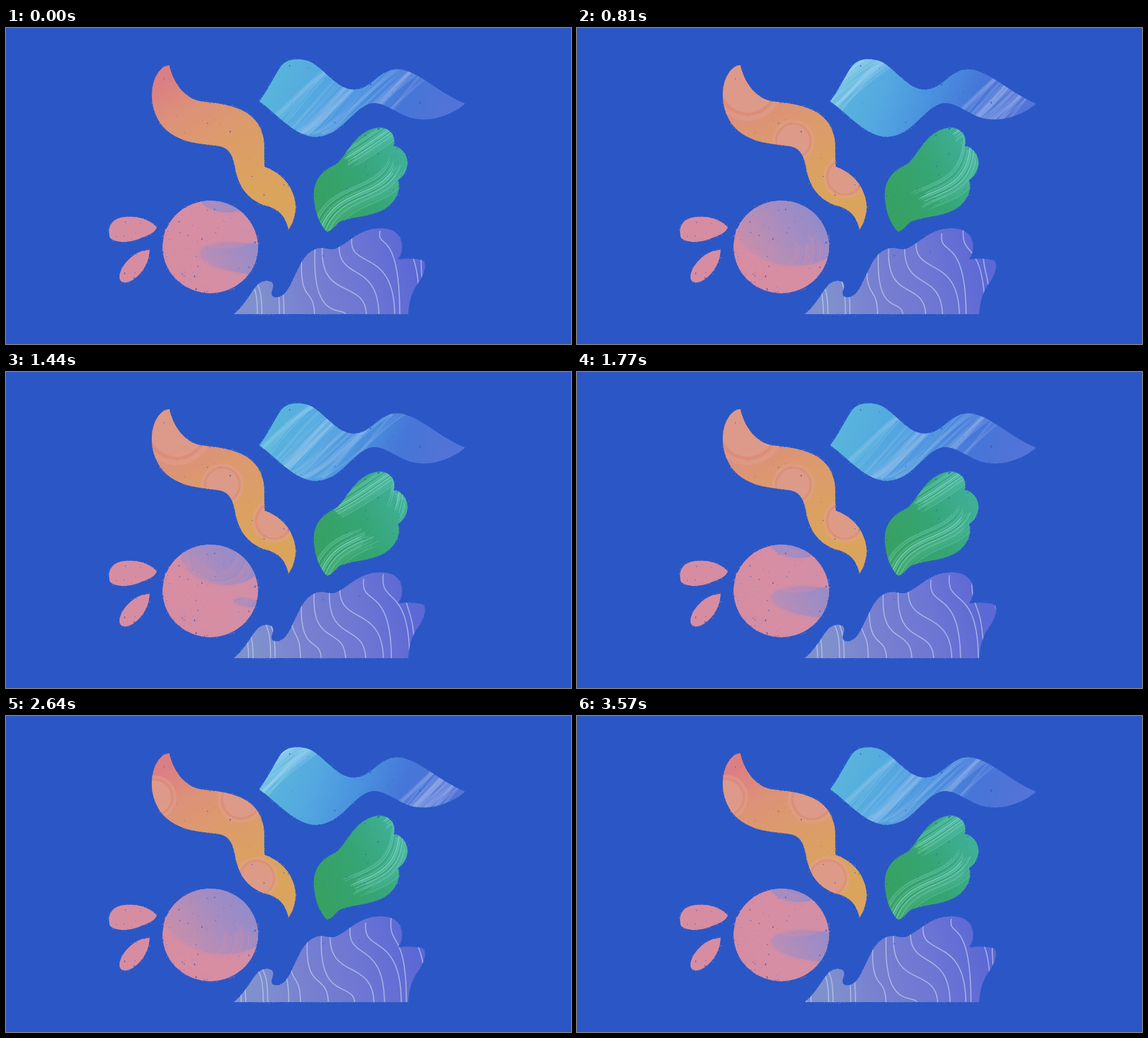
An HTML page with a canvas that plays this animation: 1000 px wide and 560 px high, repeating every 3.6 s.

```html
<!DOCTYPE html>
<html lang="en">
<head>
<meta charset="utf-8">
<title>Painted shapes</title>
<style>
html, body { margin: 0; width: 100%; height: 100%; overflow: hidden; background: #2a56c6; }
canvas { display: block; }
</style>
</head>
<body>
<canvas id="stage" width="1000" height="560"></canvas>
<script>
const BG = '#2a56c6', LOOP = 3600, HALF = LOOP / 2;
const c = document.getElementById('stage').getContext('2d');

let seed = 11;
const rnd = () => (seed = seed * 16807 % 2147483647) / 2147483647;
const many = (n, f) => Array.from({ length: n }, (_, i) => f(i));
const lerp = (a, b, k) => a + (b - a) * k;
const mix = (a, b, k) => a.map((v, i) => lerp(v, b[i], k));
const clamp = k => Math.max(0, Math.min(1, k));

function gradient(x0, y0, x1, y1, ...colors) {
  const g = c.createLinearGradient(x0, y0, x1, y1);
  colors.forEach((col, i) => g.addColorStop(i / (colors.length - 1), col));
  return g;
}

// A shape with fine spray along its outline and small bare specks inside.
function shape(d, fill, specks) {
  const el = document.createElementNS('http://www.w3.org/2000/svg', 'path');
  el.setAttribute('d', d);
  const len = el.getTotalLength(), at = k => el.getPointAtLength(k * len);
  const edge = many(len * .5, () => {
    const p = at(rnd()), r = 4 * rnd() ** 2, a = rnd() * 6.28;
    return [p.x + r * Math.cos(a), p.y + r * Math.sin(a), .2 + rnd() * .35];
  });
  const dots = many(specks, () => {
    const p = at(rnd()), q = at(rnd()), k = rnd();
    return [lerp(p.x, q.x, k), lerp(p.y, q.y, k), .3 + rnd() ** 3 * .9, rnd()];
  });
  return { path: new Path2D(d), fill, edge, dots };
}

function paint(s, inside) {
  c.fillStyle = s.fill;
  for (const [x, y, r] of s.edge) c.fillRect(x - r, y - r, 2 * r, 2 * r);
  c.save();
  c.clip(s.path);
  c.fill(s.path);
  if (inside) inside();
  c.fillStyle = BG;
  for (const [x, y, r, a] of s.dots) {
    c.globalAlpha = .2 + a * .6;
    c.fillRect(x - r, y - r, 2 * r, 2 * r * (.6 + a));
  }
  c.restore();
}

const orange = shape('M289 66C297 100 318 125 345 130C395 135 445 142 456 195C459 215 456 235 458 246C490 257 512 285 513 318C512 335 506 350 500 357C494 333 483 321 460 315C430 306 413 283 407 255C402 232 400 213 375 209C340 205 310 203 285 182C262 162 254 128 260 101C265 80 276 67 289 66Z',
  gradient(300, 85, 420, 320, '#dc7f83', '#dc9278', '#dc9b6c', '#dba062', '#dba45c'), 60);
const blue = shape('M448 130C462 112 475 84 487 67C498 53 525 52 543 62C570 80 588 109 616 109C647 109 660 73 693 73C730 75 762 113 813 134C780 162 740 166 715 159C690 150 670 132 650 133C615 137 595 193 548 193C510 192 480 152 448 130Z',
  gradient(480, 60, 770, 170, '#58b5da', '#54a9e0', '#4a93df', '#4676d8', '#5273d7'), 50);
const green = shape('M568 361C552 345 543 315 545 288C548 262 566 250 583 242C601 231 612 190 650 178C674 171 693 188 686 209C705 212 714 232 710 246C707 259 700 265 694 270C700 288 690 310 668 322C642 336 615 333 590 344C583 349 577 360 568 361Z',
  gradient(560, 310, 705, 240, '#37a163', '#36a575', '#3faf96'), 50);
const hill = shape('M403 507C422 492 434 467 445 455C455 445 473 446 473 456C473 464 465 474 476 477C497 480 505 449 518 425C527 405 539 392 555 390C566 389 572 394 583 391C605 382 620 361 650 356C684 351 701 364 701 388C701 399 697 405 694 410C712 408 727 408 738 412C747 418 738 440 731 450C719 465 713 485 712 507Z',
  gradient(440, 480, 720, 410, '#7f91cd', '#777fd0', '#6d76d3', '#5c68d5'), 15);
const ball = shape('M277 388A84.5 82 0 1 1 446 388A84.5 82 0 1 1 277 388ZM279 370L282 356L290 357L288 370Z',
  gradient(290, 440, 446, 360, '#d68da2', '#d58ea4', '#cf8fa9'), 100);
const petals = [
  'M267 353C250 334 220 331 199 337C182 344 180 359 184 372C194 382 219 380 235 374C249 368 264 364 267 353Z',
  'M254 393C233 393 213 410 204 428C198 442 200 450 210 451C226 452 255 424 254 393Z'
].map(d => shape(d, '#d68da2', 12));

// Orange: two sets of growing rings, as [x, y, radius].
const RINGS = [
  { start: 0, set: [[302, 102, 63], [383, 200, 38], [474, 264, 39]] },
  { start: 1950, set: [[263, 144, 40], [416, 148, 43], [444, 287, 39]] }
];
function rings(t) {
  const { start, set } = RINGS[t < HALF ? 0 : 1];
  const grow = 1 - (1 - clamp((t - start) / 1000)) ** 3;
  for (const [x, y, r] of set)
    for (const [k, col] of [[1, '224,162,146,.5'], [.86, '221,136,114,.6'], [.76, '222,158,142,.75']]) {
      c.fillStyle = `rgba(${col})`;
      c.beginPath();
      c.arc(x, y, r * grow * k, 0, 7);
      c.fill();
    }
}

// Blue: bands of S-shaped streaks drift to the right.
const streaks = many(75, () => [rnd() * 2 - 1, .5 + rnd() ** 4 * 9, .08 + rnd() * .2, 60 + rnd() * 45]);
function band(age) {
  const wide = 100 * Math.sin(Math.PI * clamp((age + 300) / 2500));
  const mid = 445 + .175 * age, h = 40;
  for (const [k, w, a, half] of streaks) {
    const u = mid + k * wide, tint = clamp((u - 450) / 300);
    c.strokeStyle = `rgba(${mix([165, 215, 240, a], [155, 175, 230, a], tint)})`;
    c.lineWidth = w;
    c.beginPath();
    c.moveTo(u - half, 120 + 1.7 * h);
    c.bezierCurveTo(u - 35, 120 + 1.1 * h, u + 25, 120 - 1.1 * h, u + half, 120 - 1.7 * h);
    c.stroke();
  }
}

// Green: brush hairs run along two Bezier tracks; head and tail are [start, duration].
const TRACKS = [
  { pts: [[560, 365], [590, 270], [700, 320], [700, 205]], spread: 24, head: [950, 1050], tail: [2150, 1250] },
  { pts: [[582, 246], [617, 228], [650, 205], [688, 178]], spread: 19, head: [900, 450], tail: [1500, 1300] }
];
const hairs = many(32, () => [rnd() * 2 - 1, (rnd() - .5) * .16, .25 + rnd() * .4, .5 + rnd() * .8]);
function along(pts, s) {
  while (pts.length > 1) pts = pts.slice(1).map((p, i) => mix(pts[i], p, s));
  return pts[0];
}
function brush({ pts, spread, head, tail }, t) {
  const [to, from] = [head, tail].map(([start, time]) => clamp((t - start) / time));
  if (to <= from) return;
  for (const [o, jitter, a, w] of hairs) {
    const s0 = clamp(from + jitter * Math.sign(from)), s1 = clamp(to + jitter);
    if (s1 <= s0) continue;
    c.strokeStyle = `rgba(128,212,194,${a})`;
    c.lineWidth = w;
    c.beginPath();
    for (let i = 0; i <= 16; i++) {
      const [x, y] = along(pts, lerp(s0, s1, i / 16));
      c.lineTo(x + o * spread * .7, y + o * spread * .65);
    }
    c.stroke();
  }
}

// Hill: each contour, as [top x, bottom x, bend y], flows into the one two places to its left.
const upright = x => [x - Math.max(4, (500 - x) / 4), x, 450];
const contours = [
  ...[406, 414, 445, 453, 484, 492].map(upright),
  [524, 546, 475], [547, 602, 510], [560, 638, 464], [590, 660, 431],
  [612, 688, 408], [662, 697, 372], [705, 732, 385],
  ...[741, 772, 781].map(upright)
];
function flow(p) {
  c.strokeStyle = 'rgba(190,205,238,.7)';
  c.lineWidth = 1.9;
  contours.slice(2).forEach((line, i) => {
    const [top, bottom, bend] = mix(line, contours[i], p);
    c.beginPath();
    c.moveTo(top, 350 + (700 - top) / 4);
    c.bezierCurveTo(top - 7, bend + 22, bottom, bend - 22, bottom, 511);
    c.stroke();
  });
}

// Ball: a lavender patch opens from the top while another closes at the right.
const lavender = gradient(285, 430, 435, 330, '#d08fa7', '#bd8eb2', '#a38cc2', '#918bcc');
const arcs = many(16, i => [28 + i * 5 + rnd() * 3, rnd() * .5, 2.8 + rnd() * .8, 1 + rnd() * 4]);
function patch(x, y, rx, ry) {
  c.beginPath();
  c.ellipse(x, y, rx, ry, .12, 0, 7);
  c.fill();
}
function swirl(t) {
  const open = (1 - Math.cos(2 * Math.PI * t / HALF)) / 2, shut = (1 - open) ** 3;
  c.fillStyle = c.shadowColor = lavender;
  c.shadowColor = '#b58db6';
  c.shadowBlur = 6;
  patch(...mix([385, 308, 40, 18], [380, 350, 100, 72], open ** .6));
  patch(425, 408, 82 * shut, 27 * shut);
  c.shadowBlur = 0;
  const [x, y] = mix([388, 285], [355, 395], open);
  c.strokeStyle = 'rgba(222,140,160,.3)';
  for (const [r, a0, a1, w] of arcs) {
    c.lineWidth = w;
    c.beginPath();
    c.arc(x, y, r, a0 - .5, a1 - .5);
    c.stroke();
  }
}

function draw(now) {
  const t = Math.floor(now % LOOP / 30) * 30;
  c.fillStyle = BG;
  c.fillRect(0, 0, 1000, 560);
  paint(orange, () => rings(t));
  paint(blue, () => [760, 2620].forEach(birth => band((t - birth + LOOP) % LOOP)));
  paint(green, () => TRACKS.forEach(track => [0, HALF].forEach(lap => brush(track, t % HALF + lap))));
  petals.forEach(p => paint(p));
  paint(ball, () => swirl(t));
  paint(hill, () => flow(t / LOOP));
}

const begin = performance.now();
function tick() {
  draw(performance.now() - begin);
  requestAnimationFrame(tick);
}
tick();
</script>
</body>
</html>
```
